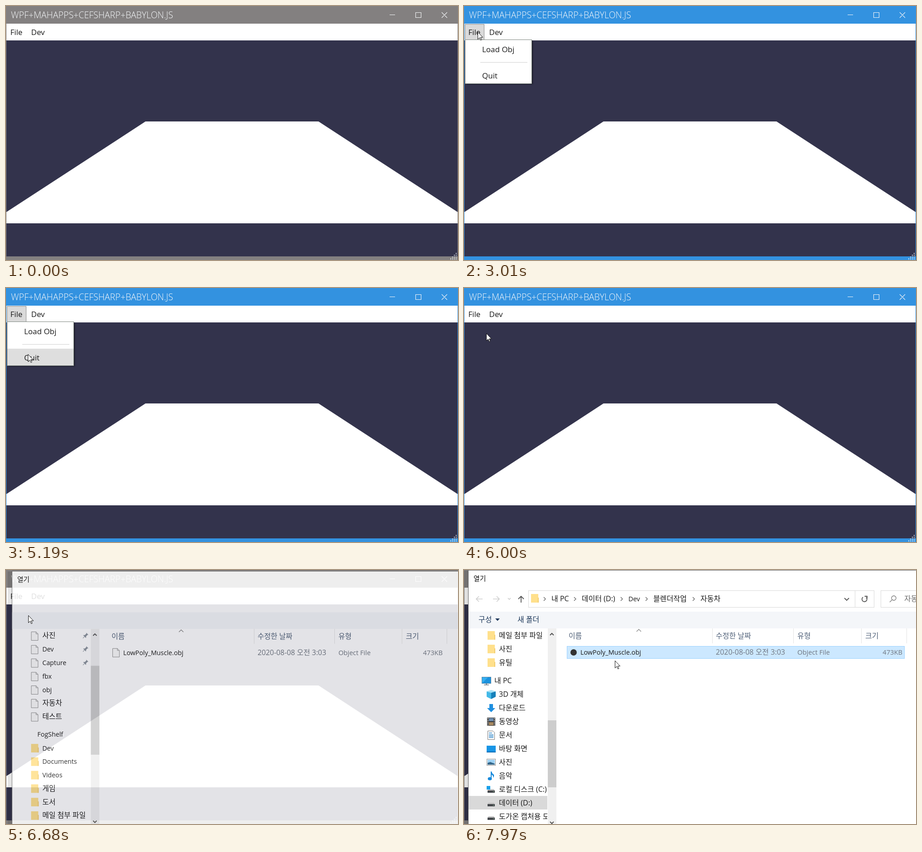
These frames come from a looping animation (998 px wide and 561 px high, 8 s). An HTML page:

```html
<!DOCTYPE html>
<html lang="ko">
<head>
<meta charset="utf-8">
<style>
  html, body { margin: 0; width: 100%; height: 100%; overflow: hidden; background: #33334c; }
  svg { display: block; width: 100%; height: 100%; }
  text { font-family: "Open Sans", "Noto Sans CJK KR", sans-serif; white-space: pre; }
</style>
</head>
<body>
<svg id="stage" viewBox="0 0 998 561" preserveAspectRatio="none"></svg>
<script>
const LOOP = 8000;
const BLUE = [51, 146, 224], GRAY = [131, 128, 128];
const INK = '#1a1a1a', HEAD = '#4f6078', DIM = '#6f7680';

const rect = (x, y, w, h, fill, more = '') =>
  `<rect x="${x}" y="${y}" width="${w}" height="${h}" fill="${fill}" ${more}/>`;
const line = (d, color, width = 1, more = '') =>
  `<path d="${d}" fill="none" stroke="${color}" stroke-width="${width}" ${more}/>`;
const shape = (d, fill, more = '') => `<path d="${d}" fill="${fill}" ${more}/>`;
const hasHangul = s => /[가-힣]|\(/.test(s);
const label = (x, y, s, fill = INK, size = hasHangul(s) ? 16 : 14.4, more = '') =>
  `<text x="${x}" y="${y}" fill="${fill}" font-size="${size}" ${more}>${s}</text>`;

// Icons are drawn around their own centre.
const drive = shape('M-6 -1H6L8 2H-8Z', '#c4c4c4') + rect(-8, 2, 16, 5, '#44474b') + rect(4, 4, 2, 1, '#9fd8a4');
const icons = {
  folder: rect(-8, -10, 16, 19, '#ffe08c') + rect(7, -2, 2, 11, '#f3cd70'),
  page: shape('M-7.5 -9.5H3L7.5 -5V9.5H-7.5Z', '#fafafa', 'stroke="#8c8c8c"') + line('M3 -9.5V-5H7.5', '#8c8c8c'),
  pc: rect(-9.5, -8.5, 20, 14, '#35aef0', 'stroke="#5b87a5"') + shape('M-9 5L4 -8H10V5Z', '#1c92dd') +
    rect(-1, 6, 3, 2, '#8a97a2') + rect(-5, 8, 11, 1.5, '#6f7c88'),
  cube: shape('M0 -4L10 -7V5L0 10Z', '#1681ba') + shape('M-10 -7L0 -4V10L-10 5Z', '#43b9e8') + shape('M0 -10L10 -7L0 -4L-10 -7Z', '#a5e2f7'),
  down: shape('M-4 -9H4V0H9L0 9L-9 0H-4Z', '#1e8fe0'),
  film: rect(-9, -9, 18, 18, '#333') + rect(-5, -8, 10, 7, '#6f8fb0') + rect(-5, 1, 10, 7, '#a88a62') +
    line('M-7 -8V9M7 -8V9', '#ddd', 2, 'stroke-dasharray="2 2"'),
  doc: shape('M-7.5 -9.5H4L7.5 -6V9.5H-7.5Z', '#fff', 'stroke="#777"') + line('M-5 -5H2M-5 -1H5M-5 2H5M-5 5H5', '#2f86c8', 1.5),
  desk: rect(-10, -7, 20, 15, '#1795e6') + rect(-10, 6, 20, 2, '#0a6cb5'),
  photo: rect(-9.5, -7.5, 19, 14, '#fff', 'stroke="#8a8a8a"') + rect(-8, -6, 16, 11, '#9cd0f2') + shape('M-8 5V1L-2 -1L8 3V5Z', '#35678a'),
  note: `<ellipse cx="-3" cy="6" rx="4.5" ry="3.5" fill="#1589dc"/>` + shape('M-1 6V-10H1Q2 -5 6 -3Q7 1 4 4Q5 -1 1 -3V6Z', '#1589dc'),
  system: drive + rect(-10, -8, 8, 8, '#18a0ea'),
  drive
};
const icon = (kind, x, y) => `<g transform="translate(${x} ${y})">${icons[kind]}</g>`;

const pin = y => `<g transform="translate(173 ${y}) rotate(45)">` +
  shape('M-3 -6H3V-5H2V0L4 2V3H-4V2L-2 0V-5H-3Z', '#8a929c') + line('M0 3V8', '#8a929c') + '</g>';

const entries = (list, y0) => list.map(([kind, name], i) => {
  const y = y0 + i * 30;
  return icon(kind, 60, y + 1) + label(77, y + 5.5, name);
}).join('');

const quickList =
  entries([['page', '사진'], ['page', 'Dev'], ['page', 'Capture'], ['page', 'fbx'],
    ['page', 'obj'], ['page', '자동차'], ['page', '테스트']], 144) +
  [144, 174, 204].map(pin).join('') +
  label(66, 369, 'FogShelf') +
  entries([['folder', 'Dev'], ['folder', 'Documents'], ['folder', 'Videos'],
    ['folder', '게임'], ['folder', '도서'], ['folder', '메일 첨부 파일']], 394);

const driveList =
  rect(10, 499, 175, 30, '#d9d9d9') +
  entries([['folder', '메일 첨부 파일'], ['folder', '사진'], ['folder', '유틸']], 144) +
  icon('pc', 49, 245) + label(67, 249.5, '내 PC') +
  entries([['cube', '3D 개체'], ['down', '다운로드'], ['film', '동영상'], ['doc', '문서'],
    ['desk', '바탕 화면'], ['photo', '사진'], ['note', '음악'], ['system', '로컬 디스크 (C:)'],
    ['drive', '데이터 (D:)'], ['drive', '도가온 캡처용 도구']], 274);

const crumbs = [[193, '내 PC'], [260, '데이터 (D:)'], [363, 'Dev'], [418, '블렌더작업'], [522, '자동차']];
const navBar =
  line('M41 64H27M33 58L27 64L33 70M64 64H78M72 58L78 64L72 70', '#cfcfcf', 1.6) +
  line('M97 62L100 65L103 62', '#c4c4c4', 1.4) +
  line('M126 72V58M120 64L126 58L132 64', '#555', 1.8) +
  rect(142.5, 45.5, 763, 37, '#fff', 'stroke="#d9d9d9"') + line('M863.5 46V82', '#d9d9d9') +
  icon('folder', 156, 63) +
  crumbs.map(([x, s]) => line(`M${x - 17} 60L${x - 13} 64L${x - 17} 68`, '#666', 1.4) + label(x, 69, s)).join('') +
  line('M840 62L845 67L850 62', '#555', 1.8) +
  line('M881 60A5.5 5.5 0 1 0 888 60.5M884.5 58H890V63', '#555', 1.8) +
  rect(920.5, 45.5, 90, 37, '#fff', 'stroke="#d9d9d9"') +
  `<circle cx="949" cy="62" r="5" fill="none" stroke="#777" stroke-width="1.3"/>` +
  line('M945 66L940 71', '#777', 1.3) + label(972, 69, '자동차 검색', '#6d6d6d') +
  rect(13, 94, 85, 33, '#d9ebf9', 'id="orgHover"') +
  label(32, 115, '구성', '#1e395b') + shape('M69 107H79L74 112.5Z', '#1e395b') +
  label(118, 115, '새 폴더', '#1e395b');

const dialog =
  rect(0, 1, 10, 620, '#000', 'opacity=".12"') +
  rect(9.5, .5, 1100, 640, '#fff', 'stroke="#5c5c5c"') +
  label(21, 24, '열기', '#111', 15) +
  rect(10, 92, 1100, 37, '#f4f6f9') +
  `<g id="nav">${navBar}</g>` +
  `<g clip-path="url(#side)"><g id="quick">${quickList}</g><g id="drives">${driveList}</g></g>` +
  rect(185, 129, 19, 500, '#f0f0f0') + rect(185, 332, 19, 148, '#cdcdcd', 'id="thumb"') +
  line('M190 144L194 140L198 144M190 556L194 560L198 556', '#505050', 2) +
  line('M381 136L386 131L391 136', '#8a8a8a', 1.4) +
  line('M548.5 129V162M727.5 129V162M877.5 129V162M977.5 129V162', '#e2e2e2') +
  label(231, 151, '이름', HEAD) + label(556, 151, '수정한 날짜', HEAD) +
  label(736, 151, '유형', HEAD) + label(886, 151, '크기', HEAD) +
  rect(227.5, 168.5, 745, 27, '#cce8ff', 'id="row"') +
  `<g id="pageIcon">${icon('page', 241, 182)}</g>` +
  `<circle id="objIcon" cx="242" cy="182" r="7" fill="#333"/>` +
  label(257, 187, 'LowPoly_Muscle.obj') + label(556, 187, '2020-08-08 오전 3:03', DIM) +
  label(736, 187, 'Object File', DIM, 14.7) + label(968, 187, '473KB', DIM, 14.7, 'text-anchor="end"');

const grip = [0, 1, 2, 3].map(r => Array.from({ length: r + 1 },
  (_, i) => rect(993 - 4 * i, 545.5 + 4 * r, 2, 2, '#e8eef4')).join('')).join('');

const stage = document.getElementById('stage');
stage.innerHTML =
  `<defs><clipPath id="side"><rect x="10" y="129" width="174" height="440"/></clipPath>
   <filter id="soft" x="-10%" y="-10%" width="125%" height="125%"><feGaussianBlur stdDeviation="1.5"/></filter></defs>` +
  rect(0, 0, 998, 561, '#838080', 'id="frame"') +
  label(11, 27, 'WPF+MAHAPPS+CEFSHARP+BABYLON.JS', '#f6f8fa', 19.6, 'font-weight="300"') +
  line('M847 19.5H859M904.5 14.5H916.5V25.5H904.5ZM962 14L974 26M974 14L962 26', '#f4f6f8', 1.1) +
  rect(1, 39, 996, 37.5, '#fff') +
  rect(1, 76, 996, 477, '#33334c') +
  shape('M308 255H690L997 455V480H1V455Z', '#fff') +
  rect(1.5, 76.5, 995, 476, 'none', 'id="focus" stroke="#15151d"') + grip +
  rect(2.5, 40.5, 42, 34, '#dadada', 'id="fileHover" stroke="#8c8c8c"') +
  label(9.5, 64, 'File', INK, 17) + label(55.5, 64, 'Dev', INK, 17) +
  `<g id="menu">` + rect(5, 77, 147, 96, '#000', 'opacity=".45" filter="url(#soft)"') +
  rect(2.5, 74.5, 147, 97, '#fff', 'stroke="#7d867f"') +
  rect(3, 75, 146, 40, '#dedede', 'id="loadHover"') + rect(3, 134, 146, 37, '#dedede', 'id="quitHover"') +
  line('M36 124.5H140', '#cfcfcf') +
  label(40, 101.5, 'Load Obj', INK, 17) + label(40, 160, 'Quit', INK, 17) + `</g>` +
  `<g id="dialog">${dialog}</g>` +
  `<g id="cursor">` + shape('M.5 .5V16.5L4.3 13L6.8 18.6L9 17.6L6.6 12.2H11.6Z', '#fff', 'stroke="#111"') + `</g>`;

const el = {};
stage.querySelectorAll('[id]').forEach(n => el[n.id] = n);
const show = (node, on) => node.setAttribute('visibility', on ? 'inherit' : 'hidden');
const clamp = v => Math.max(0, Math.min(1, v));
const smooth = p => p * p * (3 - 2 * p);

// Progress in n visible steps, the first landing at a and the last at b.
const steps = (t, a, b, n) =>
  t < a ? 0 : clamp((Math.floor((t - a) * (n - 1) / (b - a) + 1e-6) + 1) / n);

// start, end, steps, target x, target y
const moves = [
  [290, 560, 5, 517, 348],
  [900, 1432, 8, 170, 135], [1508, 1660, 3, 96, 67],
  [1730, 2010, 5, 30, 57],
  [3280, 3560, 5, 241, 90], [4090, 4230, 3, 38, 59],
  [4700, 5050, 6, 48, 148], [5120, 5460, 5, 50, 129], [5530, 5600, 2, 49, 100],
  [7090, 7640, 8, 275, 183], [7900, 7970, 2, 333, 200]
];
function cursorAt(t) {
  let x = 545, y = 570;
  for (const [a, b, n, tx, ty] of moves) {
    const p = smooth(steps(t, a, b, n));
    x += (tx - x) * p;
    y += (ty - y) * p;
  }
  return [x, y];
}

function menuOpacity(t) {
  if (t < 3630) return steps(t, 2680, 2960, 5);
  return t >= 4230 && t < 5870 ? 1 : 0;
}

function draw(t) {
  const [x, y] = cursorAt(t);
  const over = (l, top, r, b) => x >= l && x < r && y >= top && y < b;
  el.cursor.setAttribute('transform', `translate(${x.toFixed(1)} ${y.toFixed(1)})`);

  const active = t < 6470 ? steps(t, 430, 630, 4) : 0;
  el.frame.setAttribute('fill', `rgb(${GRAY.map((g, i) => Math.round(g + (BLUE[i] - g) * active))})`);
  show(el.focus, t >= 560 && t < 2540);

  const menu = menuOpacity(t);
  el.menu.setAttribute('opacity', menu);
  show(el.menu, menu > 0);
  show(el.fileHover, menu > 0 || over(2, 40, 45, 75));
  show(el.loadHover, menu > 0 && over(3, 75, 149, 115));
  show(el.quitHover, menu > 0 && over(3, 134, 149, 171));

  const p = clamp(Math.floor((t - 6470) / 70 + 1e-6) * 70 / 330);
  const fade = 1 - (1 - p) ** 2, scale = .94 + .06 * fade;
  const loaded = t >= 6750;
  show(el.dialog, fade > 0);
  el.dialog.setAttribute('opacity', fade);
  el.dialog.setAttribute('transform', `translate(480 275) scale(${scale}) translate(-480 -275)`);
  show(el.nav, loaded);
  show(el.drives, loaded);
  show(el.quick, !loaded);
  show(el.objIcon, loaded);
  show(el.pageIcon, !loaded);
  el.thumb.setAttribute('y', loaded ? 332 : 211);
  el.thumb.setAttribute('height', loaded ? 148 : 198);
  show(el.orgHover, loaded && over(13, 94, 98, 127));

  const picked = t >= 7640;
  show(el.row, picked || over(227, 169, 973, 196));
  el.row.setAttribute('fill', picked ? '#cce8ff' : '#e5f3ff');
  el.row.setAttribute('stroke', picked ? '#99d1ff' : 'none');
}

const start = performance.now();
function tick() {
  draw((performance.now() - start) % LOOP);
  requestAnimationFrame(tick);
}
tick();
</script>
</body>
</html>
```
